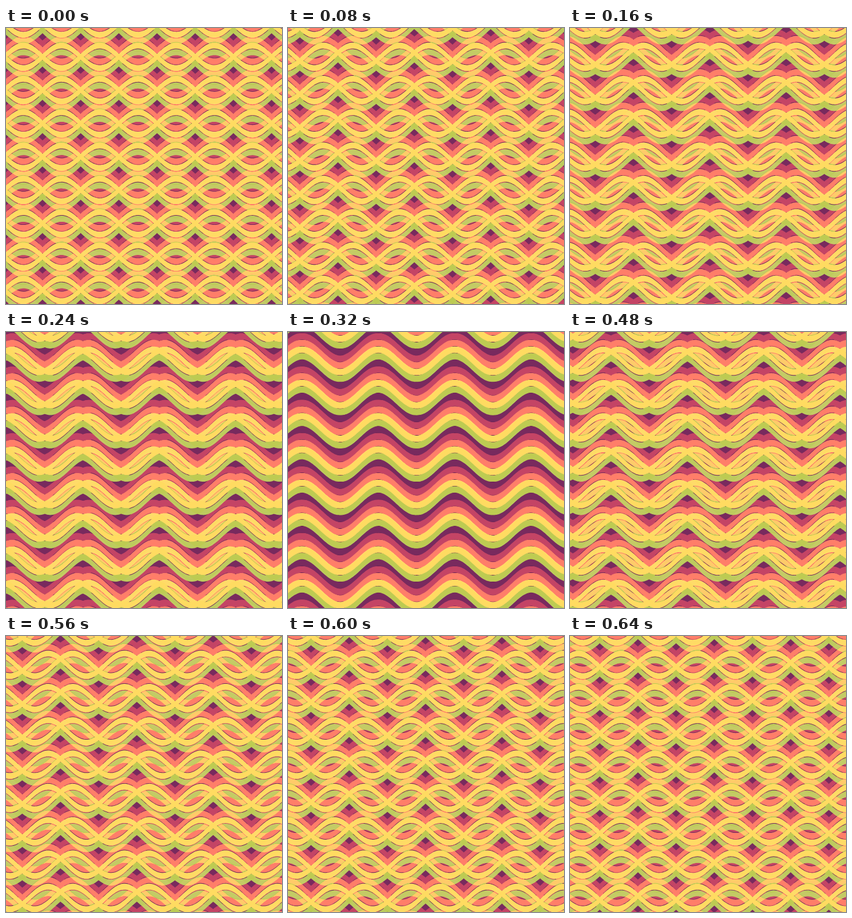
Recreate the animation shown at these times as an HTML page with a canvas. Size 450 by 450 pixels, loop 0.68 s.

```html
<!DOCTYPE html>
<html>
<head>
<meta charset="utf-8">
<style>
html, body { margin: 0; width: 100%; height: 100%; overflow: hidden; background: #641f52; }
canvas { display: block; }
</style>
</head>
<body>
<canvas id="stage" width="450" height="450"></canvas>
<script>
const ctx = document.getElementById('stage').getContext('2d');
const SIZE = 450, STEP = 40, STEPS = 17;
const COLORS = ['#ffdb61', '#bdcb40', '#782a5e', '#c44465', '#ff7e69'];
const PITCH = 10.86, THICK = 9.9, PERIOD = PITCH * COLORS.length;
const WAVELENGTH = 124.5, AMPLITUDE = 18.4;
const CENTER_X = 59.5, CENTER_Y = 47;

function band(color, y, shift) {
  const curve = x => y - AMPLITUDE * Math.cos((x - shift) * 2 * Math.PI / WAVELENGTH);
  ctx.fillStyle = color;
  ctx.beginPath();
  for (let x = -2; x <= SIZE + 2; x += 2) ctx.lineTo(x, curve(x) - THICK / 2);
  for (let x = SIZE + 2; x >= -2; x -= 2) ctx.lineTo(x, curve(x) + THICK / 2);
  ctx.fill();
}

function layer(shift) {
  for (let top = CENTER_Y - 2 * PERIOD; top < SIZE + PERIOD; top += PERIOD) {
    COLORS.forEach((color, i) => band(color, top + i * PITCH, shift));
  }
}

function draw(step) {
  const travel = WAVELENGTH * step / STEPS;
  ctx.globalCompositeOperation = 'source-over';
  ctx.fillStyle = '#641f52';
  ctx.fillRect(0, 0, SIZE, SIZE);
  // Overlapping bands keep the brighter value of each channel.
  ctx.globalCompositeOperation = 'lighten';
  layer(CENTER_X + WAVELENGTH / 4 + travel);
  layer(CENTER_X - WAVELENGTH / 4 + 2 * travel);
}

const start = performance.now();
let shown = -1;
function tick() {
  const step = Math.floor((performance.now() - start) / STEP) % STEPS;
  if (step !== shown) draw(shown = step);
  requestAnimationFrame(tick);
}
tick();
</script>
</body>
</html>
```
